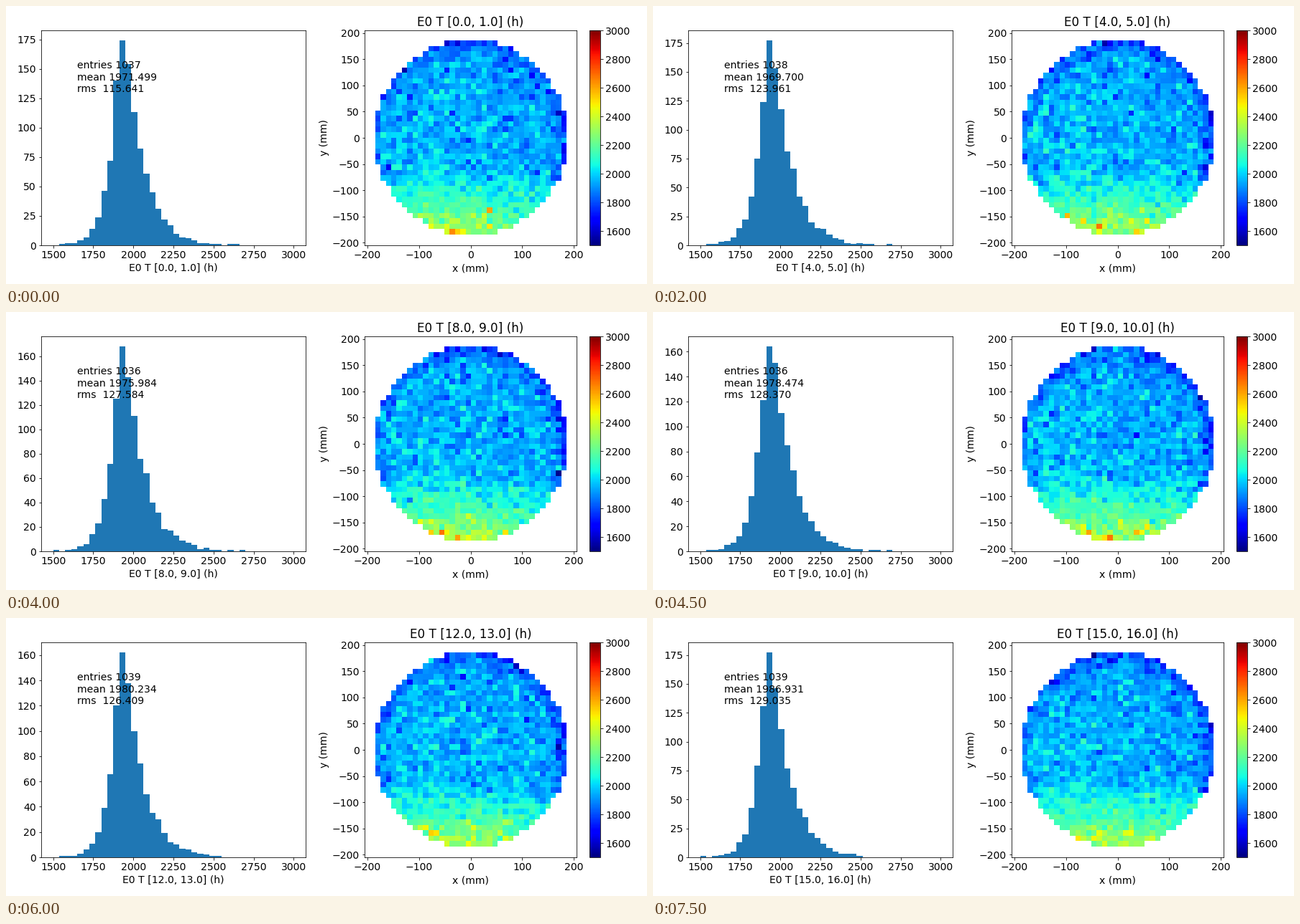
Animation, 892 px wide and 388 px high, one loop 8 s. Source, as a matplotlib script:

```python
import numpy as np
import matplotlib.pyplot as plt
from matplotlib.animation import FuncAnimation

W, H, DPI = 892, 388, 72
FRAMES, INTERVAL = 16, 500
BINS, CELLS, HALF = 40, 40, 205

plt.rcParams.update({"font.family": "DejaVu Sans", "font.size": 14})

# readout at key hours: entries, mean, rms, tallest bin
READOUT = {
    0: (1037, 1971.499, 115.641, 174),
    4: (1038, 1969.700, 123.961, 177),
    6: (1036, 1967.681, 123.498, 166),
    8: (1036, 1975.984, 127.584, 168),
    10: (1036, 1980.965, 129.156, 159),
    12: (1039, 1980.234, 126.409, 162),
    15: (1039, 1986.931, 129.035, 177),
}
edges = np.linspace(1500, 3000, BINS + 1)


def readout(hour):
    return [np.interp(hour, list(READOUT), col) for col in zip(*READOUT.values())]


def histogram(peak, rng):
    """Skewed peak: steep on the left, long exponential tail on the right."""
    d = np.arange(BINS) - 11
    fall = np.where(d < 0, 1.62, 3.0)
    h = np.exp((0.9 - np.hypot(d, 0.9)) / fall) * peak
    h += rng.normal(0, 0.4, BINS) * np.sqrt(h)
    return np.round(np.maximum(h, 0) * peak / h.max())


step = 2 * HALF / CELLS
centre = -HALF + step * (np.arange(CELLS) + 0.5)
X, Y = np.meshgrid(centre, centre)
disc = X**2 + Y**2 < 330 * step**2
U, V = X / 185, Y / 185
warm = 340 * np.maximum(-V - 0.27, 0) ** 1.2 * (1.3 - 0.4 * (U + 0.08) ** 2)
rim = 500 * np.maximum(np.hypot(U, V) - 0.83, 0) * (V > -0.5)
base = warm - rim - 20 * U - 18 * V
base += np.random.default_rng(5).normal(0, 28, X.shape)


def heat_map(counts, rng):
    """Noisy field, warm at the bottom, whose values follow the histogram."""
    field = base + rng.normal(0, 42, X.shape)
    rank = field[disc].argsort().argsort()
    cdf = np.append(0, counts.cumsum()) / counts.sum()
    grid = np.ma.masked_all(X.shape)
    grid[disc] = np.interp((rank + 0.5) / rank.size, cdf, edges)
    return grid


fig = plt.figure(figsize=((W + 1e-6) / DPI, (H + 1e-6) / DPI), dpi=DPI,
                 facecolor="white")


def axes_px(x0, x1, top=34, bottom=334):
    return fig.add_axes([x0 / W, 1 - bottom / H, (x1 - x0) / W, (bottom - top) / H])


ax_hist = axes_px(49, 417)
ax_map = axes_px(499, 794)
ax_bar = axes_px(812, 827)

bars = ax_hist.bar(edges[:-1], np.ones(BINS), np.diff(edges), align="edge",
                   color="#1f77b4")
ax_hist.set_xlim(1425, 3075)
note = ax_hist.text(1650, 0, "")

image = ax_map.imshow(np.zeros(X.shape), cmap="jet", vmin=1500, vmax=3000,
                      origin="lower", extent=(-HALF, HALF, -HALF, HALF),
                      aspect="auto", interpolation="nearest")
ax_map.set_xlabel("x (mm)")
ax_map.set_ylabel("y (mm)")
fig.colorbar(image, cax=ax_bar)


def draw(hour):
    rng = np.random.default_rng([11, hour])
    entries, mean, rms, peak = readout(hour)
    counts = histogram(peak, rng)
    for bar, count in zip(bars, counts):
        bar.set_height(count)
    ax_hist.set_ylim(0, 1.05 * counts.max())
    note.set_y(0.75 * counts.max())
    note.set_text(f"entries {entries:.0f}\nmean {mean:.3f}\nrms  {rms:.3f}")
    image.set_data(heat_map(counts, rng))
    label = f"E0 T [{hour:.1f}, {hour + 1:.1f}] (h)"
    ax_hist.set_xlabel(label)
    ax_map.set_title(label)
    return [*bars, note, image]


anim = FuncAnimation(fig, draw, frames=FRAMES, interval=INTERVAL,
                     init_func=lambda: draw(0), repeat=True, repeat_delay=0)
plt.show()
```
